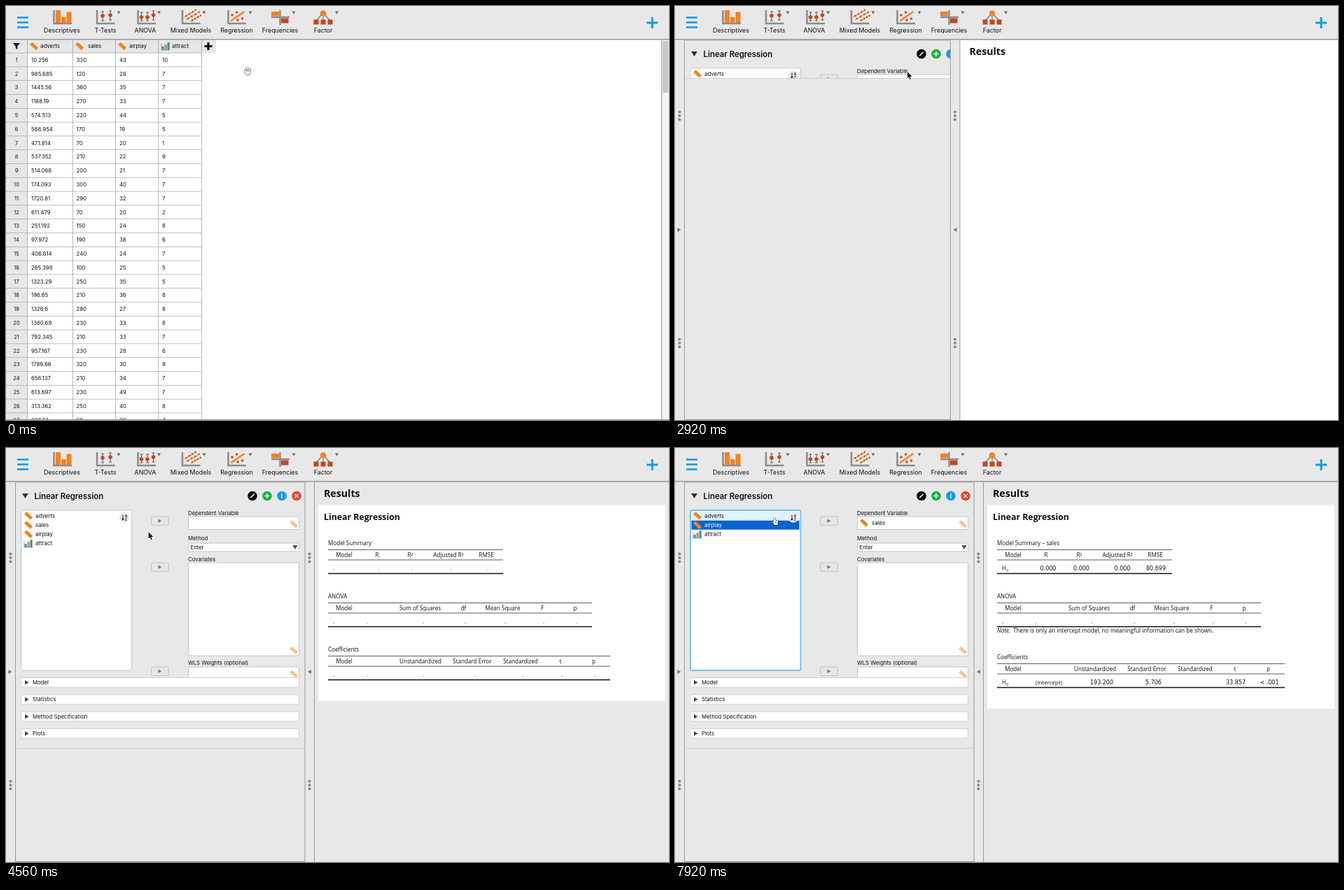
Write an HTML page with a canvas that moves like this. It is 947 by 592 pixels and loops after 8000 ms.

```html
<!DOCTYPE html>
<html lang="en">
<head>
<meta charset="utf-8">
<title>Linear regression walkthrough</title>
<style>
html, body { margin: 0; height: 100%; overflow: hidden; background: #e8e8e8; }
canvas { display: block; width: 947px; height: 592px; }
</style>
</head>
<body>
<canvas id="stage"></canvas>
<script>
const W = 947, H = 592, LOOP = 8000;
const canvas = document.getElementById('stage');
const ratio = window.devicePixelRatio || 1;
canvas.width = W * ratio;
canvas.height = H * ratio;
const c = canvas.getContext('2d');

const UI = 'Inter, Roboto, sans-serif', DOC = '"Open Sans", "Noto Sans", sans-serif', NUM = '"DejaVu Sans", sans-serif';
const BG = '#e8e8e8', ORANGE = '#f58220', RED = '#c8451b', BLUE = '#149ae6', GRAY = '#8c8c8c', GREEN = '#14b23c';

// Moments of the user's actions, in ms
const HOVER = 900, MENU = 1040, PICK = 2480, SLIDE = 2683, SELECT = 5480, ASSIGN = 6400, DONE = 7040;

const ROWS = `10.256 330 43 10|985.685 120 28 7|1445.56 360 35 7|1188.19 270 33 7|574.513 220 44 5|568.954 170 19 5
471.814 70 20 1|537.352 210 22 9|514.068 200 21 7|174.093 300 40 7|1720.81 290 32 7|611.479 70 20 2
251.192 150 24 8|97.972 190 38 6|406.814 240 24 7|265.398 100 25 5|1323.29 250 35 5|196.65 210 36 8
1326.6 280 27 8|1380.69 230 33 8|792.345 210 33 7|957.167 230 28 6|1789.66 320 30 9|656.137 210 34 7
613.697 230 49 7|313.362 250 40 8|336.51 60 20 4`.split(/[|\n]/).map(row => row.split(' '));

// Pointer path: time, x, y
const PATH = [[0, 345, 93], [200, 345, 93], [1000, 338, 34], [1320, 338, 34], [2060, 333, 86], [2240, 332, 91], [2440, 332, 94],
  [3840, 332, 94], [4640, 200, 121], [5320, 82, 110], [5560, 82, 110], [6280, 212, 108], [7160, 212, 108], [7920, 142, 99]];

const clamp = v => Math.min(1, Math.max(0, v));
const progress = (t, from, to) => clamp((t - from) / (to - from));
const smooth = p => p * p * (3 - 2 * p);
const easeOut = p => 1 - (1 - p) ** 3;

function pointerAt(t) {
  let i = 0;
  while (i < PATH.length - 2 && t >= PATH[i + 1][0]) i++;
  const [t0, x0, y0] = PATH[i], [t1, x1, y1] = PATH[i + 1];
  const p = smooth(progress(t, t0, t1));
  return [x0 + (x1 - x0) * p, y0 + (y1 - y0) * p];
}

function rect(x, y, w, h, color) {
  c.fillStyle = color;
  c.fillRect(x, y, w, h);
}
function box(x, y, w, h, fill, stroke, radius = 1.5, width = 1) {
  c.beginPath();
  c.roundRect(x, y, w, h, radius);
  c.fillStyle = fill;
  c.fill();
  c.strokeStyle = stroke;
  c.lineWidth = width;
  c.stroke();
}
function line(points, color, width = 1) {
  c.beginPath();
  points.forEach(([x, y]) => c.lineTo(x, y));
  c.strokeStyle = color;
  c.lineWidth = width;
  c.stroke();
}
function shape(points, color) {
  c.beginPath();
  points.forEach(([x, y]) => c.lineTo(x, y));
  c.fillStyle = color;
  c.fill();
}
function dot(x, y, r, color) {
  c.beginPath();
  c.arc(x, y, r, 0, 7);
  c.fillStyle = color;
  c.fill();
}
function text(str, x, y, size = 7.8, { font = UI, align = 'left', color = '#111', style = '' } = {}) {
  c.font = `${style} ${size}px ${font}`;
  c.textAlign = align;
  c.fillStyle = color;
  c.fillText(str, x, y);
}
function plus(x, y, r, color, width) {
  line([[x - r, y], [x + r, y]], color, width);
  line([[x, y - r], [x, y + r]], color, width);
}
const down = (x, y, w, h, color) => shape([[x - w / 2, y - h / 2], [x + w / 2, y - h / 2], [x, y + h / 2]], color);
const side = (x, y, w, h, color) => shape([[x - w / 2, y - h / 2], [x + w / 2, y], [x - w / 2, y + h / 2]], color);

// Icons
function ruler(x, y, alpha = 1) {
  c.save();
  c.translate(x, y);
  c.rotate(0.75);
  c.globalAlpha *= alpha;
  rect(-6, -2.4, 12, 4.8, '#f68b1f');
  for (let i = -4; i <= 4; i += 2) rect(i - 0.3, -2.4, 0.6, 2, '#b85c0a');
  c.restore();
}
function bars(x, y) {
  [[5, BLUE], [8, ORANGE], [11, BLUE]].forEach(([h, color], i) => rect(x - 5.5 + i * 4, y + 5.5 - h, 3.2, h, color));
  line([[x - 6, y - 3], [x - 6, y + 5.5], [x + 6, y + 5.5]], GRAY, 0.8);
}
const axes = (x, y) => line([[x + 1.5, y], [x + 1.5, y + 19], [x + 27, y + 19]], GRAY, 2.6);
function whisker(x, top, bottom, mid) {
  line([[x, top], [x, bottom]], '#555', 1);
  [top, bottom].forEach(y => line([[x - 2, y], [x + 2, y]], '#555', 1));
  dot(x, mid, 2.8, RED);
}
function regressionIcon(x, y, color) {
  axes(x, y);
  line([[x + 5, y + 15.5], [x + 24.5, y + 2]], ORANGE, 2.6);
  [[7, 7], [13.5, 3], [15, 14], [21.5, 12]].forEach(([dx, dy]) => plus(x + dx, y + dy, 2, color, 1.4));
}
const TOOLS = [
  ['Descriptives', 80, () => {
    axes(67, 6);
    rect(71, 6, 7, 18, ORANGE); rect(79, 16, 6.5, 8, ORANGE); rect(86.5, 8.5, 7, 15.5, ORANGE);
  }],
  ['T-Tests', 142, () => { axes(128.5, 6); whisker(138, 8, 21, 14); whisker(149, 7, 20, 13); }, 161],
  ['ANOVA', 199, () => { axes(187, 6); whisker(193.5, 9, 21, 16); whisker(202, 9, 21, 16); whisker(210.5, 7, 20, 13); }, 218.5],
  ['Mixed Models', 264, () => {
    axes(250.5, 6);
    [[255, 16, 271, 6], [257, 20, 276, 9], [264, 22, 278, 14]].forEach(([x0, y0, x1, y1]) => {
      line([[x0, y0], [x1, y1]], ORANGE, 1.3);
      for (let p = 0.15; p < 1; p += 0.28) dot(x0 + (x1 - x0) * p, y0 + (y1 - y0) * p - 0.5, 1.2, RED);
    });
  }, 283],
  ['Regression', 329.5, () => regressionIcon(316, 6, RED), 349],
  ['Frequencies', 391.5, () => {
    rect(379, 8, 11, 6.5, ORANGE); rect(393, 17.5, 10.5, 7, RED);
    line([[391.5, 6], [391.5, 27]], GRAY, 2.4);
    line([[379, 16], [405, 16]], GRAY, 2.4);
  }, 411],
  ['Factor', 453, () => {
    [443, 453, 463].forEach(x => { line([[453, 10], [x, 21]], '#777', 1.3); rect(x - 3.5, 19.5, 7, 7, RED); });
    dot(453, 10.5, 4.3, ORANGE);
  }, 472.5]
];

function toolbar(active) {
  rect(0, 0, W, 48, BG);
  if (active) {
    rect(300, 0, 59, 47, '#d9d9d9');
    [300, 359].forEach(x => line([[x, 0], [x, 47]], '#a8a8a8', 1));
  }
  [16.5, 23.5, 30.5].forEach(y => line([[16, y], [32, y]], BLUE, 2.6));
  plus(923, 24, 8, BLUE, 3);
  for (const [label, x, icon, arrow] of TOOLS) {
    icon();
    if (arrow) down(arrow, 9.5, 5, 4, '#666');
    text(label, x, 38.3, 8.85, { align: 'center' });
  }
  rect(0, 47, W, 1.5, '#9a9a9a');
}

function dataView() {
  rect(0, 48, W, H, '#fff');
  rect(0, 48, 300, 19, '#e7e7e7');
  rect(0, 48, 30, H, '#e7e7e7');
  for (let i = 0; i <= 26; i++) rect(0, 66.8 + 19.8 * i, 279, 0.6, '#999');
  [30, 95, 156, 217.5, 279].forEach(x => rect(x, 48, 0.7, H, '#999'));
  shape([[10, 53], [20, 53], [16.3, 57.5], [16.3, 62], [13.7, 60.5], [13.7, 57.5]], '#111');
  [40, 105, 166].forEach(x => ruler(x, 57.5));
  bars(228, 57.5);
  [['adverts', 49], ['sales', 117], ['airplay', 176], ['attract', 237]].forEach(([s, x]) => text(s, x, 60, 7.9));
  plus(289, 57.5, 5.5, '#000', 3);
  ROWS.forEach((row, i) => {
    const y = 79.8 + 19.8 * i;
    text(i + 1, 15, y, 7.5, { align: 'center' });
    row.forEach((value, k) => text(value, [36, 100.5, 162, 223][k], y, 7.8));
  });
  rect(936, 48, 11, H, '#f2f2f2');
  rect(936, 48, 1, H, '#999');
  rect(938, 50, 8, 74, '#c6c6c6');
  rect(0, 591, W, 1, '#999');
}

function menu() {
  c.save();
  c.shadowColor = 'rgba(0,0,0,.35)';
  c.shadowBlur = 5;
  rect(300, 48, 85.5, 138.5, '#eeeeee');
  c.restore();
  c.strokeStyle = '#bbb';
  c.lineWidth = 0.8;
  c.strokeRect(300, 48, 85.5, 138.5);
}
function menuItems(y) {
  const rows = [84.5, 98.5, 112.5, 162, 176];
  const hovered = rows.findIndex(r => y >= r - 6.5 && y < r + 7.2);
  if (hovered >= 0) rect(300.5, rows[hovered] - 6.5, 84.5, 13.5, '#d4d4d4');
  regressionIcon(303.5, 54, RED);
  regressionIcon(303.5, 131.5, GREEN);
  text('Classical', 333, 67.3, 9.2, { style: '600' });
  text('Bayesian', 333, 145, 9.2, { style: '600' });
  line([[303, 124.5], [383, 124.5]], '#bbb', 1);
  ['Correlation', 'Linear Regression', 'Logistic Regression', 'Correlation', 'Linear Regression']
    .forEach((s, i) => text(s, 307, rows[i] + 2.8, 7.7));
}

function strip(x) {
  for (const y of [157, 482]) [-5.5, 0, 5.5].forEach(d => dot(x, y + d, 2.1, '#888'));
}

function form(t, edge, px, py) {
  rect(0, 48, edge + 13, H, BG);
  c.save();
  c.beginPath();
  c.rect(0, 48, edge, 544);
  c.clip();
  const bottom = 82 + 347.5 * smooth(progress(t, 2880, 3150));
  c.save();
  c.beginPath();
  c.rect(14, 48, edge - 14, bottom - 48);
  c.clip();
  formBody(t, px, py);
  c.restore();
  line([[15, bottom], [edge, bottom]], '#cfcfcf', 1);
  c.restore();
  strip(6.5);
  side(6, 320, 5, 6, '#777');
  strip(edge + 6.5);
  side(edge + 6.5, 320, -5, 6, '#777');
  [13.5, edge, edge + 13.5].forEach(x => line([[x, 49], [x, 592]], '#999', 1));
  line([[13.5, 49], [edge, 49]], '#aaa', 1);
  line([[13.5, 591.5], [edge, 591.5]], '#999', 1);
}

function formBody(t, px, py) {
  down(27.5, 68.5, 9, 7, '#333');
  text('Linear Regression', 40.5, 72.6, 11.4, { style: '600' });
  ['#000', GREEN, BLUE, '#e4492e'].forEach((color, i) => dot(352 + 21 * i, 68.5, 6.8, color));
  line([[349.3, 71.3], [354.6, 65.8]], '#fff', 1.6);
  plus(373, 68.5, 3.4, '#fff', 1.6);
  text('i', 394, 72, 9.5, { align: 'center', color: '#fff', style: '600' });
  line([[412.4, 65.9], [417.6, 71.1]], '#fff', 1.3);
  line([[412.4, 71.1], [417.6, 65.9]], '#fff', 1.3);

  const focused = t >= SELECT, assigned = t >= ASSIGN;
  box(22, 89, 157.5, 229, '#fff', focused ? '#79c0f2' : '#c8c8c8', 2, focused ? 2 : 1);
  const names = assigned ? ['adverts', 'airplay', 'attract'] : ['adverts', 'sales', 'airplay', 'attract'];
  const hovered = px > 22 && px < 180 ? Math.floor((py - 90.5) / 13.2) : -1;
  names.forEach((name, i) => {
    const y = 97 + 13.2 * i, selected = focused && i === 1;
    if (selected) rect(23.5, y - 6.5, 154, 13, '#0a63d0');
    else if (i === hovered) rect(23.5, y - 6.5, 154, 13, '#def3fc');
    name === 'attract' ? bars(32, y) : ruler(32, y);
    text(name, 42, y + 2.8, 7.9, { color: selected ? '#fff' : '#111' });
  });
  dot(169, 99.5, 7.3, '#e9e9e9');
  line([[167, 95.5], [167, 103]], '#222', 1);
  down(167, 102.5, 4, 3, '#222');
  text('A', 171.5, 99, 5, { align: 'center', style: '600' });
  text('Z', 171.5, 104, 5, { align: 'center', style: '600' });

  [98, 164, 313].forEach(y => {
    const over = px > 207 && px < 233 && py > y && py < y + 13;
    box(207.5, y, 25, 12.5, over ? '#cecece' : '#e6e6e6', over ? '#999' : '#c4c4c4');
    side(220, y + 6.3, 5, 5.5, '#777');
  });

  text('Dependent Variable', 260, 95.8);
  box(260.5, 98, 158, 18.5, '#fff', '#c4c4c4');
  ruler(411, 109, 0.45);
  if (assigned) {
    ruler(270, 107);
    text('sales', 281, 109.6, 7.9);
  }
  text('Method', 260, 131.5);
  box(260.5, 136, 158, 12, '#fff', '#c4c4c4');
  text('Enter', 263.5, 144.8);
  down(413, 142, 7.5, 6, '#555');
  text('Covariates', 260, 161.8);
  box(260.5, 164, 158, 133, '#fff', '#c4c4c4');
  ruler(411, 289.5, 0.45);
  text('WLS Weights (optional)', 260, 310.4);
  box(260.5, 313, 158, 20, '#fff', '#c4c4c4');
  ruler(411, 323.5, 0.45);
  rect(255, 328.5, 168, 8, BG);

  ['Model', 'Statistics', 'Method Specification', 'Plots'].forEach((label, i) => {
    const y = 335.3 + 24.3 * i;
    box(22, y - 6.8, 396.5, 13.6, '#fff', '#d0d0d0');
    side(29.8, y, 5.5, 6.5, '#444');
    text(label, 38, y + 2.8);
  });
}

function table(title, y, right, heads, cells) {
  text(title, 460, y, 8.1, { font: DOC });
  line([[460, y + 6.5], [right, y + 6.5]], '#333', 0.8);
  line([[460, y + 21], [right, y + 21]], '#333', 0.8);
  line([[460, y + 40.5], [right, y + 40.5]], '#111', 1.6);
  heads.forEach(([s, x]) => text(s, x, y + 17, 8.1, { font: DOC, align: 'center' }));
  cells.forEach(([s, x]) => {
    if (s === 'H0') {
      text('H', 467, y + 36, 8.1, { font: DOC });
      text('0', 473.2, y + 37.5, 5.5, { font: DOC });
    } else {
      text(s, x, y + 36, 8, { font: /\d/.test(s) ? NUM : DOC, align: 'center' });
    }
  });
}
const dots = (...xs) => xs.map(x => ['.', x]);

function results(t, left) {
  const ready = t >= 3080, done = t >= DONE;
  rect(left, 48.5, W, H, ready ? BG : '#fff');
  text('Results', left + 13.5, 70, 14.2, { font: DOC, style: 'bold' });
  if (!ready) return;
  const shown = smooth(progress(t, 3360, 3560));
  c.save();
  c.globalAlpha = 0.3 + 0.7 * shown;
  rect(446, 81.5, 496, done ? 291 : 280, '#fff');
  c.globalAlpha = 0.45 + 0.55 * shown;
  text('Linear Regression', 454, 103, 12.3, { font: DOC, style: 'bold' });
  if (t >= ASSIGN && !done) {
    const turn = t / 1000 * Math.PI * 2;
    c.beginPath();
    c.arc(586, 99, 4.2, turn, turn + 4.6);
    c.strokeStyle = '#777';
    c.lineWidth = 1.4;
    c.stroke();
  }
  table(done ? 'Model Summary – sales' : 'Model Summary', 139, 710,
    [['Model', 483], ['R', 530], ['R²', 577.5], ['Adjusted R²', 632], ['RMSE', 686]],
    done ? [['H0'], ['0.000', 533], ['0.000', 580.5], ['0.000', 639], ['80.699', 687]] : dots(468, 532, 580, 635, 688));
  table('ANOVA', 215, 837,
    [['Model', 483], ['Sum of Squares', 591.5], ['df', 653.5], ['Mean Square', 709.5], ['F', 766], ['p', 813]],
    dots(468, 516, 596, 656, 713, 768, 815));
  if (done) {
    text('Note.', 460, 264.3, 8.2, { font: DOC, style: 'italic' });
    text('There is only an intercept model, no meaningful information can be shown.', 483, 264.3, 8.2, { font: DOC });
  }
  const shift = done ? 8 : 0;
  table('Coefficients', done ? 302 : 291, 863 + shift,
    [['Model', 483], ['Unstandardized', 592 + shift], ['Standard Error', 666 + shift], ['Standardized', 735 + shift], ['t', 792 + shift], ['p', 839.5 + shift]],
    done ? [['H0'], ['(Intercept)', 534], ['193.200', 609.5], ['5.706', 683.5], ['33.857', 801], ['< .001', 849]]
      : dots(468, 516, 596, 670, 738, 794, 841));
  c.restore();
}

const CURSORS = {
  arrow: new Path2D('M0 0V9.2L2.1 7.3L3.6 10.8L5.1 10.2L3.6 6.8H6.5Z'),
  point: new Path2D('M-.9 .8Q0-.6 .9 .8V4L2.3 4.2L5 5.2Q5.7 7 4.6 9V11H-.6V9.6L-3 6.6Q-2.6 5.2-.9 6.6Z'),
  grab: new Path2D('M-4.5 0Q-4-1.6-2.8-.3L-3.4-3Q-2.5-4.6-1.6-3L-1-4.5Q0-5.5 .7-4.2Q2-5 2.5-3.3Q4.2-4 4.4-2V1.5L3 5H-2Z')
};
function cursor(x, y, kind) {
  c.save();
  c.translate(x, y);
  c.lineJoin = 'round';
  const dark = kind === 'arrow';
  c.strokeStyle = dark ? '#fff' : '#111';
  c.lineWidth = dark ? 1.4 : 1;
  c.fillStyle = dark ? '#000' : '#fff';
  c.stroke(CURSORS[kind]);
  c.fill(CURSORS[kind]);
  if (kind === 'grab') [-1.4, 0.4, 2.2].forEach(fx => line([[fx, -2.5], [fx, 0.5]], '#111', 0.7));
  if (kind === 'point') [1, 2.8].forEach(fx => line([[fx, 5.5], [fx, 8]], '#111', 0.6));
  c.restore();
}
function cursorKind(t, x, y) {
  if (t < MENU && y > 48) return 'grab';
  const onList = x > 22 && x < 180 && y > 89, onButton = x > 207 && x < 233 && y > 98 && y < 111;
  return t > PICK && (onList || onButton) ? 'point' : 'arrow';
}

function draw() {
  const t = performance.now() % LOOP;
  const [x, y] = pointerAt(t);
  c.setTransform(ratio, 0, 0, ratio, 0, 0);
  if (t < SLIDE) {
    dataView();
  } else {
    const edge = 14 + 413 * easeOut(progress(t, SLIDE, SLIDE + 420));
    results(t, edge + 13.5);
    form(t, edge, x, y);
  }
  toolbar(t >= HOVER && t < PICK);
  if (t >= MENU && t < PICK) {
    menu();
    menuItems(y);
  }
  cursor(x, y, cursorKind(t, x, y));
  requestAnimationFrame(draw);
}
draw();
</script>
</body>
</html>
```
